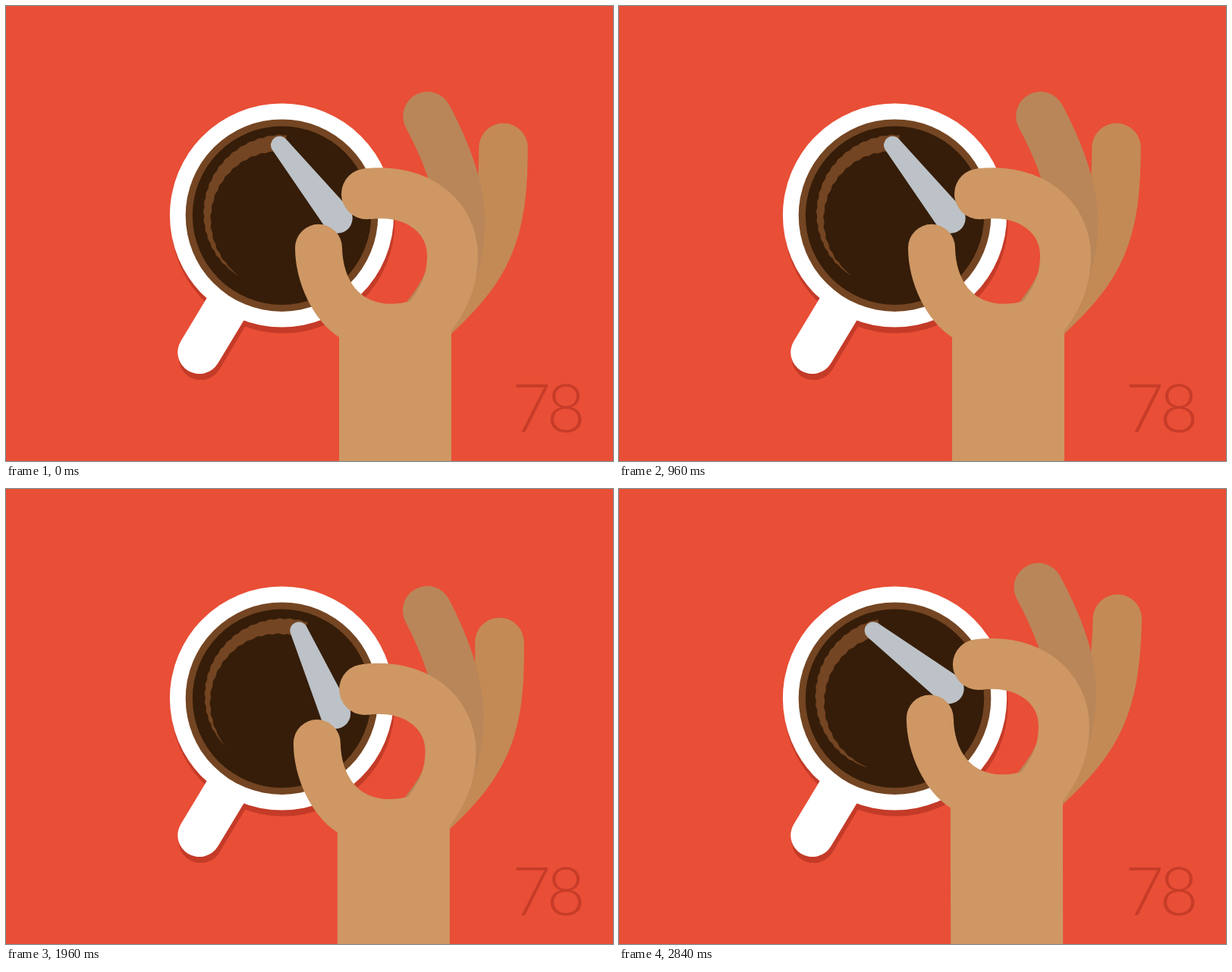
Animation, 800 px wide and 600 px high, one loop 2880 ms. Source, as an HTML page:

```html
<!DOCTYPE html>
<html lang="en">
<head>
<meta charset="utf-8">
<title>Stirring coffee</title>
<style>
  html, body { margin: 0; width: 100%; height: 100%; overflow: hidden; background: #e94e36; }
  svg { display: block; width: 100vw; height: 100vh; }
  .finger { fill: none; stroke-width: 64.5; stroke-linecap: round; }
  text { font: 300 88px Lato, "Open Sans", sans-serif; letter-spacing: -5.5px; fill: #c63c29; }
</style>
</head>
<body>
<svg viewBox="0 0 800 600">
  <defs>
    <g id="mug">
      <circle cx="363.5" cy="276" r="147.6"/>
      <path d="M254.8 456.6L310 365" stroke-width="57" stroke-linecap="round"/>
    </g>
  </defs>
  <rect width="800" height="600" fill="#e94e36"/>
  <text x="667" y="561.5">78</text>
  <use href="#mug" x="1.5" y="8" fill="#c43b28" stroke="#c43b28" stroke-opacity="1" style="stroke-width:0"/>
  <path d="M256.8 464.6L311.5 373" stroke="#c43b28" stroke-width="57" stroke-linecap="round"/>
  <use href="#mug" fill="#fff"/>
  <path d="M254.8 456.6L310 365" stroke="#fff" stroke-width="57" stroke-linecap="round"/>
  <circle cx="363.5" cy="276.2" r="126.8" fill="#744522"/>
  <circle cx="363.5" cy="276.2" r="117.7" fill="#351d09"/>
  <path id="trail" fill="#744522"/>
  <path id="spoon" fill="#bcc2c7"/>
  <g id="hand">
    <path id="ring" class="finger" stroke="#c38a56"/>
    <path id="middle" class="finger" stroke="#b98659"/>
    <path id="palm" fill="#ce9764"/>
    <g id="index" fill="none" stroke="#ce9764" stroke-width="67">
      <path d="M475.5 248C545 240 588.5 280 588.5 330C588.5 365 575 390 555 415"/>
      <circle cx="475.5" cy="248" r="33.5" fill="#ce9764" stroke="none"/>
    </g>
  </g>
</svg>
<script>
const TURN = 960, STEP = 40;
const { sin, cos, PI, hypot, atan2, acos } = Math;
const RAD = PI / 180;
const $ = id => document.getElementById(id);
const set = (id, name, value) => $(id).setAttribute(name, value);
const fix = n => n.toFixed(2);
const pt = (x, y) => fix(x) + ' ' + fix(y);

// Smooth periodic offset that is zero at the start of each turn.
const sway = (t, a, b, c) => a * (1 - cos(t)) + b * sin(t) + c * (1 - cos(2 * t));

// Tapered streak with slightly ragged edges, built pointing straight up.
function trailPath() {
  const LENGTH = 144, outer = [], inner = [];
  for (let lag = -4; lag <= LENGTH; lag += 2) {
    const k = lag / LENGTH;
    const half = 11 * Math.max(0, 1 - Math.max(0, k)) ** 0.9;
    const mid = 98 - 3.3 * k * k;
    const rough = half > 1 ? 0.7 : 0;
    const at = r => pt(-r * sin(lag * RAD), -r * cos(lag * RAD));
    outer.push(at(mid + half + rough * sin(lag * 0.9)));
    inner.unshift(at(mid - half + rough * sin(lag * 0.7 + 2)));
  }
  return 'M' + outer.concat(inner).join('L') + 'Z';
}

function spoonPath(gx, gy, tx, ty) {
  const R = 20, r = 11.5;
  const d = atan2(ty - gy, tx - gx);
  const b = acos((R - r) / hypot(tx - gx, ty - gy));
  const at = (x, y, rad, a) => pt(x + rad * cos(a), y + rad * sin(a));
  return `M${at(gx, gy, R, d + b)}A${R} ${R} 0 1 1 ${at(gx, gy, R, d - b)}` +
    `L${at(tx, ty, r, d - b)}A${r} ${r} 0 0 1 ${at(tx, ty, r, d + b)}Z`;
}

function ringPath(t) {
  const dx = sway(t, 22.9, -12.5, -3.95);
  const x = 655.5 + dx, y = 187 + sway(t, 0.3, -4, -1.15);
  const tilt = dx * 0.0066;
  return `M${pt(x, y)}C${pt(x - 115 * sin(tilt), y + 115 * cos(tilt))} 634 344 565 409`;
}

function middlePath(t) {
  const dx = sway(t, 6.4, 4.5, 2.5);
  const x = 555.5 + dx, y = 145.5 + sway(t, -0.7, -4.5, -1.9);
  const jx = 599 + dx * 0.3;
  const tilt = 0.49 - dx * 0.006;
  return `M${pt(x, y)}C${pt(x + 53 * sin(tilt), y + 53 * cos(tilt))} ${pt(jx, 240)} ${pt(jx, 285)}` +
    `C${pt(jx, 330)} 585 372 555 408`;
}

function palmPath(shift, bottom) {
  return 'M381 319A31 31 0 0 1 443 319C444 362 466 393 507 393Q520 393 531 390L560 400L587 405V424' +
    `L${pt(587 + shift, bottom)}L${pt(439 + shift, bottom)}L439 437C405 415 381 365 381 319Z`;
}

function draw(ms) {
  const t = Math.floor(ms / STEP) * STEP % TURN / TURN * 2 * PI;
  const c = cos(t), s = sin(t);
  const x = 63 * (c - 1), y = 63 * s + 1.3 * c - 1.5;
  const elbow = 57.7 * (c - 1) - 0.75 * s;

  set('trail', 'transform', `translate(362 279) rotate(${fix(t / RAD)})`);
  set('spoon', 'd', spoonPath(368.7 + 68 * c - s, 280.5 + 63.5 * s - 0.8 * c, 360.5 + 98 * s, 281.3 - 98 * c));
  set('hand', 'transform', `translate(${pt(x, y)})`);
  set('ring', 'd', ringPath(t));
  set('middle', 'd', middlePath(t));
  set('palm', 'd', palmPath(elbow - x, 600 - y));
  set('index', 'transform', `rotate(${fix(-sway(t, 0.029, 0.009, 0.008) / RAD)} 555 415)`);
}

set('trail', 'd', trailPath());
const start = performance.now();
function tick() {
  draw(performance.now() - start);
  requestAnimationFrame(tick);
}
tick();
</script>
</body>
</html>
```
